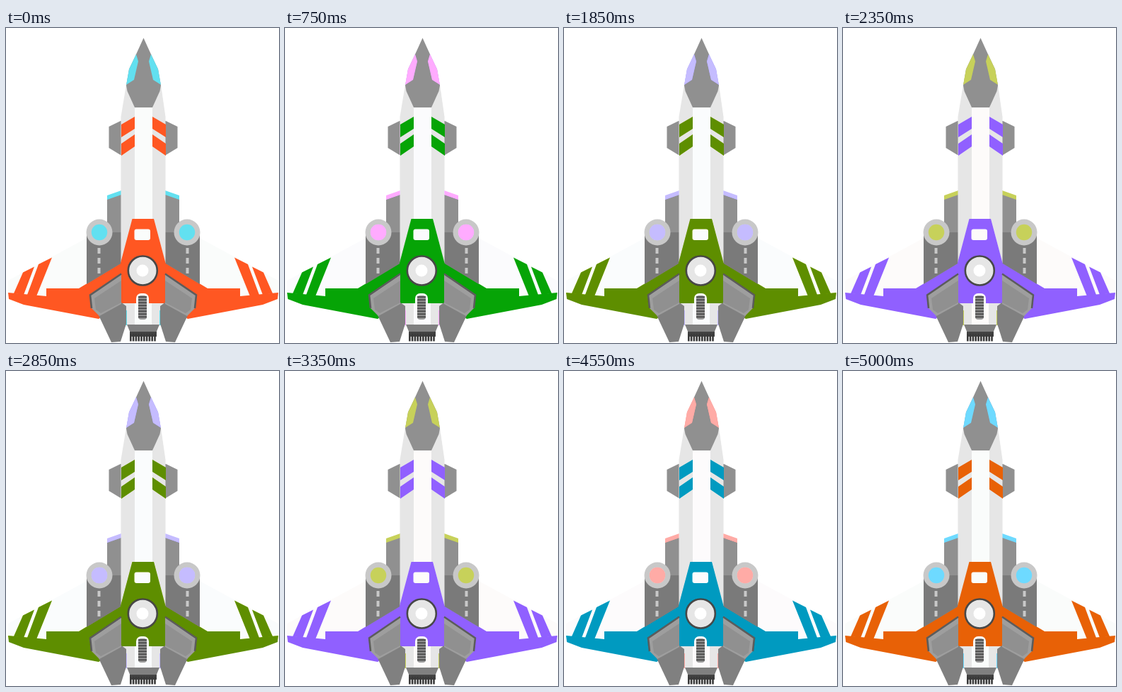
These frames come from a looping animation (386x444 px, 5050 ms). An HTML page:

```html
<!DOCTYPE html>
<html lang="en">
<head>
<meta charset="utf-8">
<title>Starship</title>
<style>
  html, body { margin: 0; width: 100%; height: 100%; overflow: hidden; background: #fff; }
  svg { display: block; width: 386px; height: 444px; }
  .paint { fill: #ff5722; }
  .glass { fill: #62e0f0; }
  .white { fill: #fafcfb; }
  .light { fill: #e6e6e6; }
  .ring { fill: #c8c8c8; }
  .rim { fill: #9e9e9e; }
  .grey { fill: #909090; }
  .steel { fill: #808080; }
</style>
</head>
<body>
<svg id="ship" viewBox="0 0 386 444">
  <defs>
    <!-- Port half; the starboard half is its mirror image. -->
    <g id="wing">
      <path class="white" d="M116 295 3 356V377L58 380 116 370Z"/>
      <path class="paint" d="M65 323.500 46 333 30 376 43 378ZM40 336.500 24 344.500 11 374 25 376Z"/>
      <path class="paint" d="M3 373 57 378V367H103L163 331V388L131 410 25 390 4 382Z"/>
      <path class="grey" d="M143 240 164 234V300H143Z"/>
      <path class="glass" d="M143 236 163 229V235L143 242Z"/>
      <path fill="#7a7a7a" d="M114 288H164V331L114 361Z"/>
      <path d="M131.500 310V346" stroke="#c8c8c8" stroke-width="4" stroke-dasharray="8 6"/>
      <circle class="ring" cx="132" cy="288" r="18.500"/>
      <circle class="glass" cx="132" cy="288" r="11.200"/>
      <path class="grey" d="M145.500 139 162 131H166V179H162L145.500 169Z"/>
    </g>
    <g id="pod">
      <path class="glass" d="M163 398H171V419H163Z"/>
      <path class="steel" d="M131 405 162 386 170 392V417L162 442 149 443Z"/>
      <path class="rim" d="M163 347 119 377 121 395 132 406 163 389Z"/>
      <path class="grey" d="M163 356 125 381 127 397 134 402 163 387Z"/>
      <path d="M163 346.500 119 376.500 121 395" fill="none" stroke="#5c5c5c" stroke-width="2.600"/>
    </g>
    <g id="trim">
      <path class="paint" d="M163 136 182 125V142L163 154ZM163 163 182 150V167L163 180Z"/>
      <path class="glass" d="M184 37 187 47 181 73 170 80 174 58Z"/>
    </g>
  </defs>

  <use href="#wing"/>
  <use href="#wing" transform="matrix(-1 0 0 1 388 0)"/>

  <path class="light" d="M170 80 162.500 125V331H225.500V125L219 80Z"/>
  <path class="white" d="M182 108H207V280H182Z"/>
  <path class="grey" d="M194.500 14 184 37 174 58 170 81 171.500 89 182 112H207L217.500 89 219 81 215 58 205 37Z"/>
  <use href="#trim"/>
  <use href="#trim" transform="matrix(-1 0 0 1 389 0)"/>

  <path class="light" d="M163 386H225L217 419H171Z"/>
  <path class="white" d="M182 386H206V418H182Z"/>
  <path class="steel" d="M171 418H217L212 430H176Z"/>
  <path fill="#444" d="M175 428H213V435H175Z"/>
  <path d="M175 436H213" stroke="#3a3a3a" stroke-width="11" stroke-dasharray="2.600 1.200"/>

  <path class="paint" d="M178.500 269H209L225.500 331V388H162V331Z"/>
  <use href="#pod"/>
  <use href="#pod" transform="matrix(-1 0 0 1 388 0)"/>

  <rect class="white" x="181.500" y="283.500" width="22.500" height="15.500" rx="3"/>
  <circle class="light" cx="193.300" cy="342" r="20.500" stroke="#484848" stroke-width="2.600"/>
  <circle cx="193" cy="342" r="8.500" fill="#fff"/>
  <rect class="white" x="184" y="374" width="18" height="39" rx="7"/>
  <rect class="rim" x="187" y="377" width="12" height="34" rx="4"/>
  <path d="M193 378V410" stroke="#555" stroke-width="12" stroke-dasharray="2.400 1.600"/>
</svg>
<script>
  const STEP = 50, COUNT = 101;

  // The first step shows the plain livery; after it the hue turns back 18° per step.
  const hue = k => k ? 13 - 18 * k : 0;
  const frames = Array.from({ length: COUNT + 1 }, (_, k) => ({
    offset: k / COUNT,
    filter: `hue-rotate(${hue(Math.min(k, COUNT - 1))}deg)`,
    easing: 'steps(1, end)'
  }));

  document.getElementById('ship').animate(frames, {
    duration: STEP * COUNT,
    iterations: Infinity
  });
</script>
</body>
</html>
```
